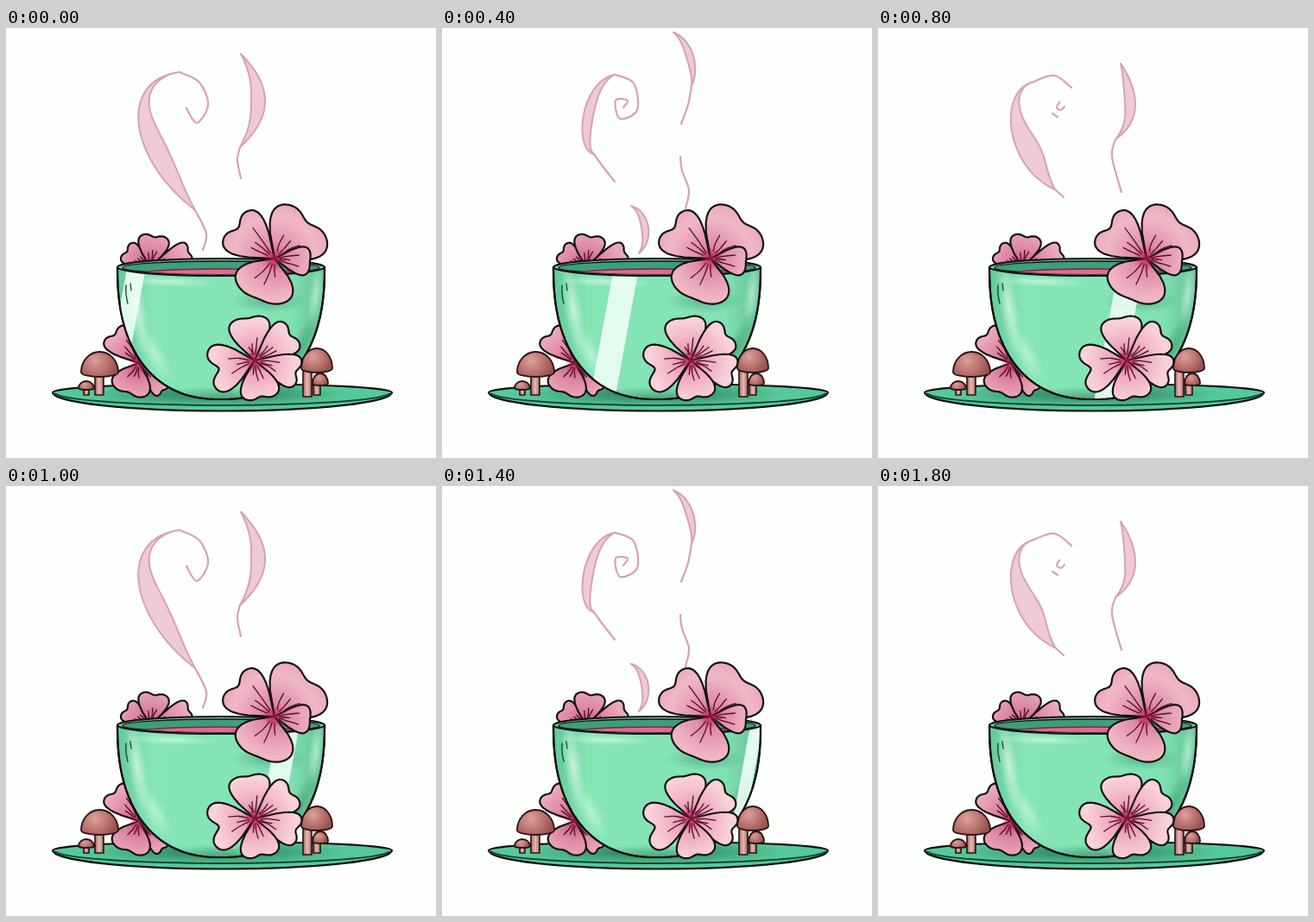
An HTML page with a canvas that plays this animation: 498x498 px, repeating every 2 s.

```html
<!DOCTYPE html>
<html lang="en">
<head>
<meta charset="utf-8">
<title>Flower tea</title>
<style>
html, body { margin: 0; width: 100%; height: 100%; overflow: hidden; background: #fdfffc; }
canvas { display: block; width: 498px; height: 498px; }
</style>
</head>
<body>
<canvas id="stage" width="498" height="498"></canvas>
<script>
const ctx = document.getElementById('stage').getContext('2d');
const INK = '#151012', STEAM_EDGE = '#d8a1b2', STEAM_FILL = '#eecad5';
const STEP = 200, STEPS = 10;
const { PI, sin, cos, sign, abs, sqrt, exp, hypot } = Math;
const RAD = PI / 180;
ctx.lineCap = ctx.lineJoin = 'round';

const sample = (n, fn) => Array.from({ length: n + 1 }, (_, i) => fn(i / n));

function seeded(seed) {
  return () => (seed = (seed * 16807) % 2147483647) / 2147483647;
}

function paint(fill, stroke = INK, width = 2.2) {
  if (fill) { ctx.fillStyle = fill; ctx.fill(); }
  if (stroke) { ctx.strokeStyle = stroke; ctx.lineWidth = width; ctx.stroke(); }
}

function polygon(points) {
  ctx.beginPath();
  points.forEach(p => ctx.lineTo(...p));
  ctx.closePath();
}

function ellipse(x, y, rx, ry, from = 0, to = 2 * PI) {
  ctx.beginPath();
  ctx.ellipse(x, y, rx, ry, 0, from, to);
}

// Catmull-Rom curve through a few points.
function curve(points, color, width) {
  const at = i => points[Math.max(0, Math.min(points.length - 1, i))];
  ctx.beginPath();
  ctx.moveTo(...points[0]);
  for (let i = 0; i < points.length - 1; i++) {
    const [a, b, c, d] = [at(i - 1), at(i), at(i + 1), at(i + 2)];
    ctx.bezierCurveTo(b[0] + (c[0] - a[0]) / 6, b[1] + (c[1] - a[1]) / 6,
      c[0] - (d[0] - b[0]) / 6, c[1] - (d[1] - b[1]) / 6, ...c);
  }
  paint(null, color, width);
}

function withStops(gradient, colors) {
  colors.forEach((c, i) => gradient.addColorStop(i / (colors.length - 1), c));
  return gradient;
}
const radial = (x, y, r, ...colors) => withStops(ctx.createRadialGradient(x, y, 0, x, y, r), colors);
const across = (x0, x1, ...colors) => withStops(ctx.createLinearGradient(x0, 0, x1, 0), colors);

function glow(x, y, rx, ry, angle, color, alpha) {
  ctx.save();
  ctx.globalAlpha = alpha;
  ctx.translate(x, y);
  ctx.rotate(angle);
  ctx.scale(rx, ry);
  ctx.fillStyle = radial(0, 0, 1, color, color + '00');
  ctx.fillRect(-1, -1, 2, 2);
  ctx.restore();
}

function saucer() {
  const x = 250.5, y = 422, rx = 196.5;
  ctx.beginPath();
  ctx.ellipse(x, y, rx, 10, 0, PI, 2 * PI);
  ctx.ellipse(x, y, rx, 21.5, 0, 0, PI);
  ctx.closePath();
  paint('#55c99a');
  ctx.save();
  ctx.clip();
  glow(245, 424, 150, 15, 0, '#1f6b4c', .85);
  ctx.restore();
  ellipse(x, y, rx - 2, 15, .1, PI - .1);
  paint(null, '#164232', 2);
}

// A petal is [direction, length, half spread, notch depth], with angles in degrees.
function petalPoint(x, y, [dir, length, spread, notch = .1], t) {
  const angle = (dir + spread * t) * RAD;
  const r = length * sqrt(1 - t ** 6) * (1 - notch * exp(-((t / .25) ** 2)));
  return [x + r * cos(angle), y + r * sin(angle)];
}

function flower(x, y, petals, colors, veinLength, seed) {
  const random = seeded(seed);
  const fill = radial(x, y, 64, ...colors);
  for (const petal of petals) {
    polygon(sample(48, s => petalPoint(x, y, petal, 2 * s - 1)));
    paint(fill);
  }
  for (const petal of petals) {
    for (const side of [-.38, 0, .38]) {
      const tip = petalPoint(x, y, petal, side);
      const reach = veinLength * (.65 + .5 * random());
      const bend = .06 * (random() - .5);
      const on = k => [x + k * (tip[0] - x), y + k * (tip[1] - y)];
      const [mx, my] = on(reach * .6);
      curve([on(.14), [mx - bend * (tip[1] - y), my + bend * (tip[0] - x)], on(reach)], '#4b1026', 1.3);
    }
  }
  glow(x, y, 12, 12, 0, '#c02058', .7);
}

const ROSE = ['#c9406f', '#e18ba7', '#e8a3b8', '#f0b8c7', '#e9a9bb'];
const BLUSH = ['#cf3f72', '#eda3b9', '#f3bccb', '#f8d3db', '#f5c6d1'];
const DUSK = ['#c8497a', '#dd87a3', '#eaa9bb', '#eeb5c4'];

function backFlowers() {
  flower(167, 277, [[-22, 50, 22, .05], [-146, 36, 32], [-82, 39, 40]], DUSK, .6, 11);
  flower(154, 388, [[50, 44, 20, .05], [-131, 48, 32], [110, 40, 52]], DUSK, .6, 23);
}

function topFlower() {
  flower(311, 267, [[112, 53, 62, .05], [-140, 64, 39, .14], [-48, 65, 54, .13], [5, 42, 34, .02]], ROSE, .62, 5);
}

function frontFlower() {
  flower(288, 385, [[-99, 52, 40, .05], [-36, 56, 32], [16, 55, 30], [80, 47, 42], [167, 56, 44, .24]], BLUSH, .5, 7);
}

const CUP = { x: 249, y: 277, rx: 120, depth: 153, power: 2.35 };

function bowlPath() {
  const round = v => sign(v) * abs(v) ** (2 / CUP.power);
  polygon(sample(72, s => [CUP.x + CUP.rx * round(cos(PI * s)), CUP.y + CUP.depth * round(sin(PI * s))]));
}

// The glint turns around the cup at a steady rate, then rests out of sight.
function glint(step) {
  const angle = (step - 2.9) * 20 * RAD;
  if (angle > PI / 2) return;
  const x = CUP.x + 116 * sin(angle);
  const half = 6 + 9 * cos(angle), slant = 28;
  polygon([[x - half, 280], [x + half, 280], [x + half - slant, 432], [x - half - slant, 432]]);
  paint('rgba(244,255,249,.85)', null);
}

function cup(step) {
  const { x, y, rx } = CUP;
  bowlPath();
  paint(across(x - rx, x + rx, '#62c99a', '#86e5b7', '#84e4b6', '#84e4b6', '#84e4b6', '#80e0b1', '#5fc093'));
  ctx.save();
  ctx.clip();
  glow(152, 325, 11, 55, -.15, '#effff7', .65);
  glow(172, 377, 12, 36, -.5, '#dfffee', .5);
  glow(190, 294, 55, 6, .03, '#dfffee', .6);
  glow(359, 308, 9, 40, .12, '#dcfcec', .6);
  glow(250, 430, 95, 15, 0, '#2b845f', .7);
  glow(341, 372, 12, 50, .45, '#2f8a64', .5);
  glow(305, 316, 45, 14, 0, '#3f9f78', .6);
  glint(step);
  ctx.restore();
  bowlPath();
  paint();

  ellipse(x, y, rx, 10);
  paint('#6fd3a5');
  ellipse(x, y + .5, rx - 6, 7.5);
  paint('#3d9f79', INK, 1.3);
  ctx.save();
  ctx.clip();
  ellipse(x, y + 8, 96, 6);
  paint('#e06a92', '#7b2445', 1.5);
  ctx.restore();
  curve([[139, 298], [139, 308], [141, 319]], '#174a37', 1.4);
  curve([[144, 296], [145, 304]], '#174a37', 1.3);
}

function mushroom(x, top, width, height, stemX, stemWidth, foot) {
  const base = top + height * .82, half = width / 2;
  const left = stemX - stemWidth / 2;
  ctx.beginPath();
  ctx.rect(left, base, stemWidth, foot - base);
  paint(across(left, left + stemWidth, '#a86564', '#e6bcb3', '#a96462'), '#2a1214', 1.6);
  ctx.beginPath();
  ctx.ellipse(x, base, half, base - top, 0, PI, 2 * PI);
  ctx.ellipse(x, base, half, height * .18, 0, 0, PI);
  ctx.closePath();
  paint(radial(x - width * .12, top + height * .35, width * .6, '#dba09a', '#bf7873', '#985350'), '#2a1214', 1.8);
}

function mushrooms() {
  mushroom(108.5, 375, 43, 29, 108, 10, 425);
  mushroom(93, 409, 18, 10, 93, 6, 425);
  mushroom(364, 400, 18, 14, 360, 8, 425);
  mushroom(360, 371, 36, 28, 349, 10, 427);
}

// A cubic edge a-b-c-d, thickened on one side; skew moves the thickest part towards d.
function ribbon(a, b, c, d, bulge, skew = 1) {
  const mix = (t, i) => (1 - t) ** 3 * a[i] + 3 * t * (1 - t) ** 2 * b[i] + 3 * t * t * (1 - t) * c[i] + t ** 3 * d[i];
  const slope = (t, i) => (1 - t) ** 2 * (b[i] - a[i]) + 2 * t * (1 - t) * (c[i] - b[i]) + t * t * (d[i] - c[i]);
  const edge = sample(30, t => [mix(t, 0), mix(t, 1)]);
  const swollen = sample(30, t => {
    const dx = slope(t, 0), dy = slope(t, 1);
    const w = bulge * sin(PI * t ** skew) / hypot(dx, dy);
    return [mix(t, 0) + w * dy, mix(t, 1) - w * dx];
  });
  polygon([...edge, ...swollen.reverse()]);
  paint(STEAM_FILL, STEAM_EDGE, 2);
}

const wisp = (...points) => curve(points, STEAM_EDGE, 2.2);

const steam = [
  function rise() {
    wisp([201, 51], [224, 63], [234, 89], [221, 110], [209, 93]);
    ribbon([201, 51], [130, 60], [140, 150], [219, 211], 23, 1.8);
    wisp([219, 211], [232, 238], [228, 257]);
    ribbon([272, 30], [310, 68], [309, 103], [271, 138], -16);
    wisp([271, 138], [268, 153], [272, 174]);
  },
  function curl() {
    wisp([200, 54], [221, 63], [229, 88], [213, 108], [198, 93], [212, 80]);
    ribbon([200, 54], [148, 58], [149, 164], [213, 199], 21, 2);
    wisp([213, 199], [221, 211], [229, 223]);
    ribbon([274, 13], [298, 28], [321, 75], [284, 95], -14);
    wisp([284, 95], [273, 122], [271, 147]);
  },
  function part() {
    wisp([200, 54], [222, 64], [226, 95], [206, 105], [201, 84], [215, 84], [210, 92]);
    ribbon([200, 54], [160, 62], [152, 141], [176, 146], 11);
    wisp([176, 146], [186, 160], [200, 178]);
    ribbon([219, 206], [241, 212], [247, 246], [228, 261], -8);
    ribbon([268, 5], [291, 14], [299, 47], [289, 67], -8);
    wisp([289, 67], [285, 89], [277, 111]);
    wisp([276, 149], [278, 165], [286, 188], [282, 209]);
  },
  function scatter() {
    wisp([198, 57], [215, 57], [229, 77]);
    wisp([224, 96], [206, 103], [203, 84], [216, 87], [209, 91]);
    ribbon([190, 64], [173, 72], [172, 92], [174, 105], 7);
    ribbon([168, 138], [205, 155], [217, 166], [222, 218], -20);
    wisp([259, 2], [271, 15], [276, 41]);
    ribbon([287, 97], [296, 113], [284, 125], [272, 145], -11);
    wisp([272, 145], [272, 157], [276, 170]);
  },
  function gather() {
    wisp([224, 69], [204, 55], [178, 63]);
    wisp([210, 86], [207, 92], [212, 95], [216, 91]);
    wisp([202, 99], [208, 103]);
    ribbon([178, 63], [138, 75], [148, 162], [205, 187], 25, 1.8);
    wisp([205, 187], [215, 196]);
    ribbon([281, 41], [298, 66], [311, 104], [275, 129], -12);
    wisp([275, 129], [271, 149], [282, 190]);
  }
];

function draw(step) {
  ctx.fillStyle = '#fdfffc';
  ctx.fillRect(0, 0, 498, 498);
  saucer();
  backFlowers();
  cup(step);
  mushrooms();
  topFlower();
  frontFlower();
  steam[step % steam.length]();
}

let shown = 0;
const start = performance.now();
function tick(now) {
  const step = Math.floor(Math.max(0, now - start) / STEP) % STEPS;
  if (step !== shown) draw(shown = step);
  requestAnimationFrame(tick);
}
draw(0);
requestAnimationFrame(tick);
</script>
</body>
</html>
```
